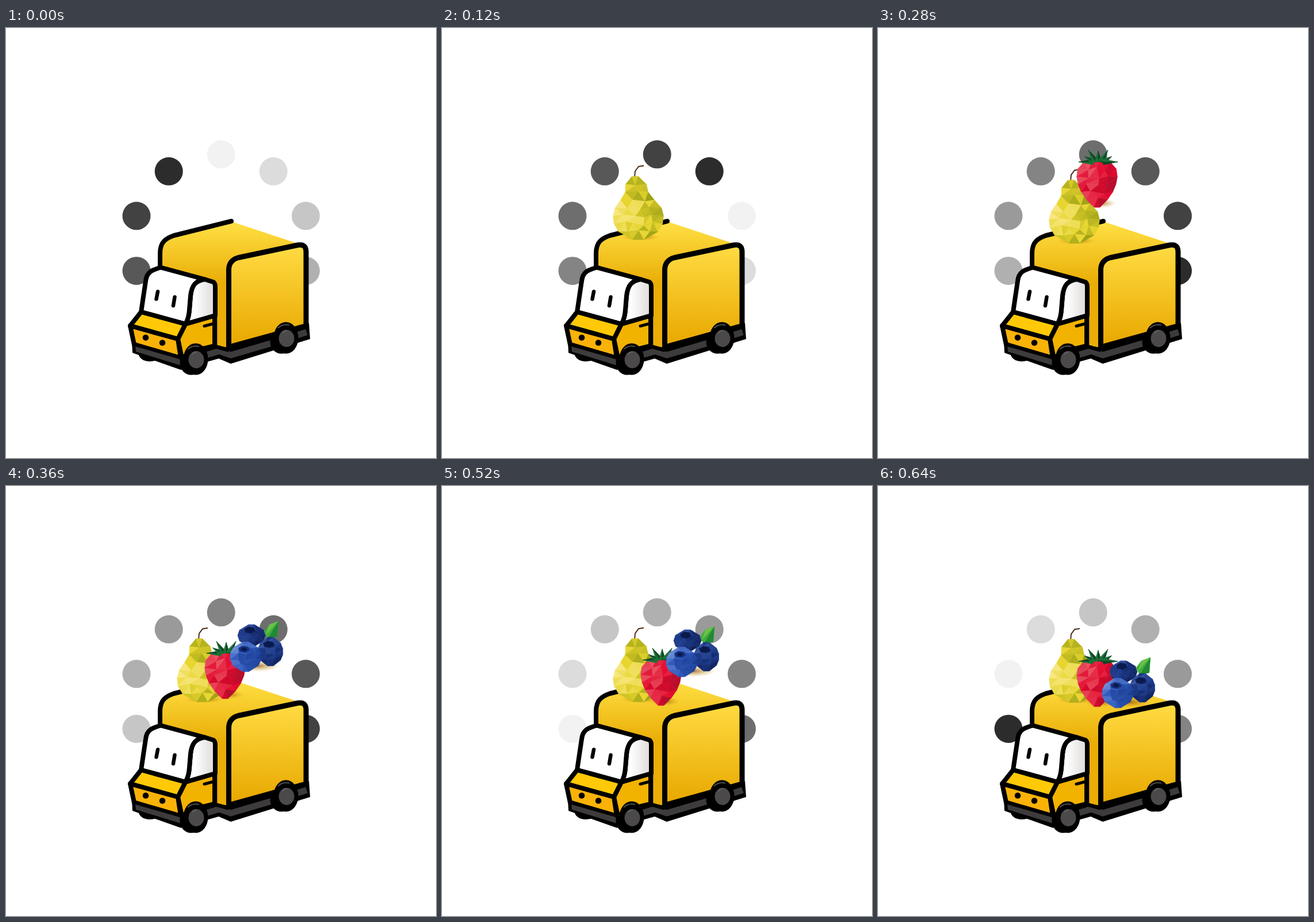
Animation, 748 px wide and 748 px high, one loop 680 ms. Source, as an HTML page:

```html
<!DOCTYPE html>
<html lang="en">
<head>
<meta charset="utf-8">
<title>Loading truck</title>
<style>
  html, body { margin: 0; width: 100%; height: 100%; overflow: hidden; background: #fff; }
  svg { display: block; width: 100vw; height: 100vh; }
  .line { fill: none; stroke: #000; stroke-width: 8; stroke-linecap: round; stroke-linejoin: round; }
  .ink { stroke: #000; stroke-width: 8; stroke-linejoin: round; }
  .thin { stroke-width: 6.5; }
  .bold { stroke-width: 9; }
  .glint { fill: none; stroke: #666; stroke-width: 1.5; }
</style>
</head>
<body>
<svg viewBox="0 0 748 748" xmlns="http://www.w3.org/2000/svg">
  <defs>
    <linearGradient id="roof" gradientUnits="userSpaceOnUse" x1="0" y1="338" x2="0" y2="445">
      <stop offset="0" stop-color="#ffe044"/><stop offset="1" stop-color="#e9ad06"/>
    </linearGradient>
    <linearGradient id="side" gradientUnits="userSpaceOnUse" x1="0" y1="380" x2="0" y2="550">
      <stop offset="0" stop-color="#ffdb42"/><stop offset="1" stop-color="#e8a800"/>
    </linearGradient>
    <linearGradient id="glass">
      <stop offset=".3" stop-color="#fff"/><stop offset="1" stop-color="#dcd9d8"/>
    </linearGradient>
    <radialGradient id="shade">
      <stop offset="0" stop-color="#8a5200" stop-opacity=".75"/><stop offset="1" stop-color="#e0a020" stop-opacity="0"/>
    </radialGradient>
  </defs>

  <g id="dots"></g>

  <g id="box">
    <path fill="url(#roof)" d="M268 420V392C268 372 278 366 292 361L393 337L511 376L524 390L388 430V560L362 552V445Z"/>
    <path class="line" d="M268 416V392C268 372 278 366 292 361L392 336"/>
    <path d="M345 560L366 553L388 556L522 516L527 513L529 541L391 584L370 575L345 582Z"/>
    <path fill="none" stroke="#3d3b3c" stroke-width="11" d="M348 569L371 562L391 569L466 547L523 529"/>
    <path class="ink bold" fill="url(#side)" d="M387.500 555V420Q388 404 404 399.500L508 377.500Q522 375 522 390V518Z"/>
  </g>

  <g id="cab">
    <ellipse cx="250" cy="567" rx="19" ry="13"/>
    <path class="ink" fill="#f2b200" d="M299 541L312 515L363 500V553L338 559L306 574Z"/>
    <path class="ink" fill="url(#glass)" d="M312 515Q318 505 319 490L321 466C323 447 330 440 345 437L361 442Q364 444 364 451V500Z"/>
    <path class="line thin" d="M364 446V554L386 560"/>
    <path class="line" style="stroke-width:5" d="M345 518.500L360 514.500"/>
    <path class="ink" fill="#fff" d="M235 494L243 440C245 424 254 421 269 416.500L345 437C330 440 323 447 321 466L319 490Q318 505 312 515Z"/>
    <path class="line thin" d="M264 458.500L261.500 471.500M293.500 468L291 483"/>
    <path class="ink" fill="#ffc907" d="M235 494L312 515L299 541L216 518Z"/>
    <path class="ink" fill="#f9b208" d="M216 518L299 541L304 574L223 551Z"/>
    <path d="M219 545L304 570L311 582L305 595L220 565Z"/>
    <path fill="#3d3b3c" d="M225 554L302 576L304 587L226 563Z"/>
    <circle cx="243" cy="538.500" r="5.300"/><circle cx="272" cy="547.500" r="5.300"/>
  </g>

  <g id="pear">
    <ellipse cx="345" cy="372" rx="34" ry="6" fill="url(#shade)"/>
    <path fill="none" stroke="#4a2d18" stroke-width="2" d="M335 268L336 257L342 249L351 247.500"/>
  </g>
  <g id="strawberry">
    <ellipse cx="387" cy="376" rx="27" ry="8" fill="url(#shade)"/>
  </g>
  <g id="berries">
    <ellipse cx="438" cy="376" rx="38" ry="10" fill="url(#shade)"/>
    <path fill="#3fae3a" d="M474 298L458 304L449 316L455 329L472 325Z"/>
    <path fill="#6cc04a" d="M474 298L458 304L452 322Z"/>
    <path fill="#218a33" d="M474 298L472 325L455 329Z"/>
  </g>
</svg>
<script>
const FRAME = 40, FRAMES = 17;
const { PI, sin, cos, sqrt, max, min, round, floor, abs } = Math;
const $ = id => document.getElementById(id);
const add = (id, markup) => $(id).insertAdjacentHTML('beforeend', markup);
const times = (n, fn) => Array.from({ length: n }, (_, i) => fn(i));
const poly = (pts, fill) =>
  `<polygon points="${pts.join(' ')}" fill="${fill}" stroke="${fill}" stroke-width=".6" stroke-linejoin="round"/>`;

let seed = 7;
const rnd = () => (seed = seed * 16807 % 2147483647) / 2147483647;
const jitter = size => (rnd() - .5) * size;

// Shade from a light, middle and dark colour, v from 0 to 1.
function shade(stops, v) {
  const x = min(1.999, max(0, v * 2)), i = floor(x);
  return `rgb(${stops[i].map((c, k) => round(c + (stops[i + 1][k] - c) * (x - i)))})`;
}

// Low-poly solid of revolution: half(y) is its half width, mid(y) its axis.
function solid(id, { top, bottom, cell, half, mid, stops, tone }) {
  const bands = round((bottom - top) / cell / .8);
  const mesh = times(bands + 1, k => {
    const y = top + (bottom - top) * k / bands, w = max(5, half(y));
    const n = max(1, round(2 * w / cell));
    return times(n + 1, i => {
      const loose = i > 0 && i < n && k > 0 && k < bands ? cell * .45 : 0;
      return [mid(y) + w * (2 * i / n - 1) + jitter(loose), y + jitter(loose)];
    });
  });
  const width = max(...mesh.flat().map(p => abs(p[0] - mid(p[1]))));
  let out = '';
  for (let k = 0; k < bands; k++) {
    const a = mesh[k], b = mesh[k + 1], m = a.length - 1, n = b.length - 1;
    for (let i = 0, j = 0; i < m || j < n;) {
      const upper = j === n || (i < m && (i + .5) / m <= (j + .5) / n);
      const tri = [a[i], b[j], upper ? a[++i] : b[++j]];
      const [x, y] = [0, 1].map(c => (tri[0][c] + tri[1][c] + tri[2][c]) / 3);
      const v = tone((x - mid(y)) / width, (y - top) / (bottom - top));
      out += poly(tri, shade(stops, v + jitter(.4)));
    }
  }
  add(id, out);
}
const arc = (y, cy, rx, ry) => rx * sqrt(max(0, 1 - ((y - cy) / ry) ** 2));

function wheel(id, x, y) {
  add(id, `<ellipse cx="${x - 8}" cy="${y + 7}" rx="19.500" ry="20.500"/>
    <ellipse cx="${x}" cy="${y}" rx="21.500" ry="27.500"/>
    <ellipse cx="${x + 1}" cy="${y + 1}" rx="13.500" ry="15" fill="#4b494a"/>
    <path class="glint" d="M${x - 14} ${y - 17}q8 -8 20 -5m-12 14q3 -5 8 -4"/>`);
}
wheel('box', 487, 539);
wheel('cab', 330, 576);

solid('pear', {
  top: 266, bottom: 376, cell: 18,
  half: y => max(arc(y, 291, 20, 26), arc(y, 337, 44, 40)),
  mid: y => 336 + min(5.5, (y - 266) / 10),
  stops: [[250, 234, 140], [230, 212, 44], [140, 150, 18]],
  tone: (x, y) => .44 + x * .28 + (y < .42 ? .2 : 0) + max(0, y - .7) * .7
});

solid('strawberry', {
  top: 303, bottom: 383, cell: 17,
  half: y => 35.5 * max(0, 1 - ((y - 325) / (y < 325 ? 32 : 58)) ** 2) ** .75,
  mid: () => 381,
  stops: [[238, 116, 124], [226, 8, 46], [158, 16, 42]],
  tone: (x, y) => .36 + x * .2 + y * .25
});

// Crown of pointed sepals fanned over the top.
times(7, i => {
  const a = PI * (1 + i / 6), long = i % 2 ? .8 : 1;
  const tip = [383 + 34 * long * cos(a), 304 + 24 * long * sin(a)];
  const base = [383 + 9 * cos(a), 304];
  const edge = s => [base[0] - s * 6 * sin(a), base[1] + s * 5 * cos(a)];
  add('strawberry', poly([tip, base, edge(-1)], '#1d7037') + poly([tip, base, edge(1)], '#0b4726'));
});

function berry(cx, cy, rx, ry, stops) {
  solid('berries', {
    top: cy - ry, bottom: cy + ry, cell: 12.5,
    half: y => arc(y, cy, rx, ry), mid: () => cx, stops,
    tone: (x, y) => .38 + x * .2 + y * .3
  });
  const ring = (size, n) => times(n, i => {
    const a = i * 2 * PI / n + .3;
    return [cx - 3 + 10 * size * cos(a), cy - ry / 2 + 6 * size * sin(a)];
  });
  add('berries', poly(ring(1, 6), shade(stops, 1)) + poly(ring(.55, 5), '#0b1a4a'));
}
const navy = [[66, 98, 172], [27, 56, 136], [12, 28, 82]];
const blue = [[130, 160, 226], [42, 86, 186], [22, 50, 128]];
berry(427, 323, 24, 19, navy);
berry(460, 351, 22, 25, navy);
berry(417, 360, 27.5, 26, blue);

const dots = times(10, i => {
  const a = i * PI / 5;
  add('dots', `<circle cx="${374.2 + 154.8 * sin(a)}" cy="${374.6 - 154.8 * cos(a)}" r="24.500"/>`);
  return $('dots').lastChild;
});

// Each fruit appears, hangs until its fall, then lands with a small damped bob.
const drops = {
  pear: { show: 1, fall: 1, from: 66, speed: 29 },
  strawberry: { show: 5, fall: 7, from: 71, speed: 29 },
  berries: { show: 9, fall: 12.5, from: 63, speed: 18 }
};
function height({ fall, from, speed }, step) {
  const s = max(0, step - fall), landed = s - from / speed;
  return landed < 0 ? speed * s - from : 3.5 * Math.exp(-.12 * landed) * sin(landed * PI / 3);
}

function draw() {
  const step = floor(performance.now() / FRAME) % FRAMES;
  const head = Math.ceil(step / 2);
  dots.forEach((dot, i) => {
    const g = 242 - 22 * ((i - head + 10) % 10);
    dot.setAttribute('fill', `rgb(${g},${g},${g})`);
  });
  for (const [id, drop] of Object.entries(drops)) {
    $(id).setAttribute('visibility', step < drop.show ? 'hidden' : 'visible');
    $(id).setAttribute('transform', `translate(0 ${height(drop, step)})`);
  }
  requestAnimationFrame(draw);
}
draw();
</script>
</body>
</html>
```
